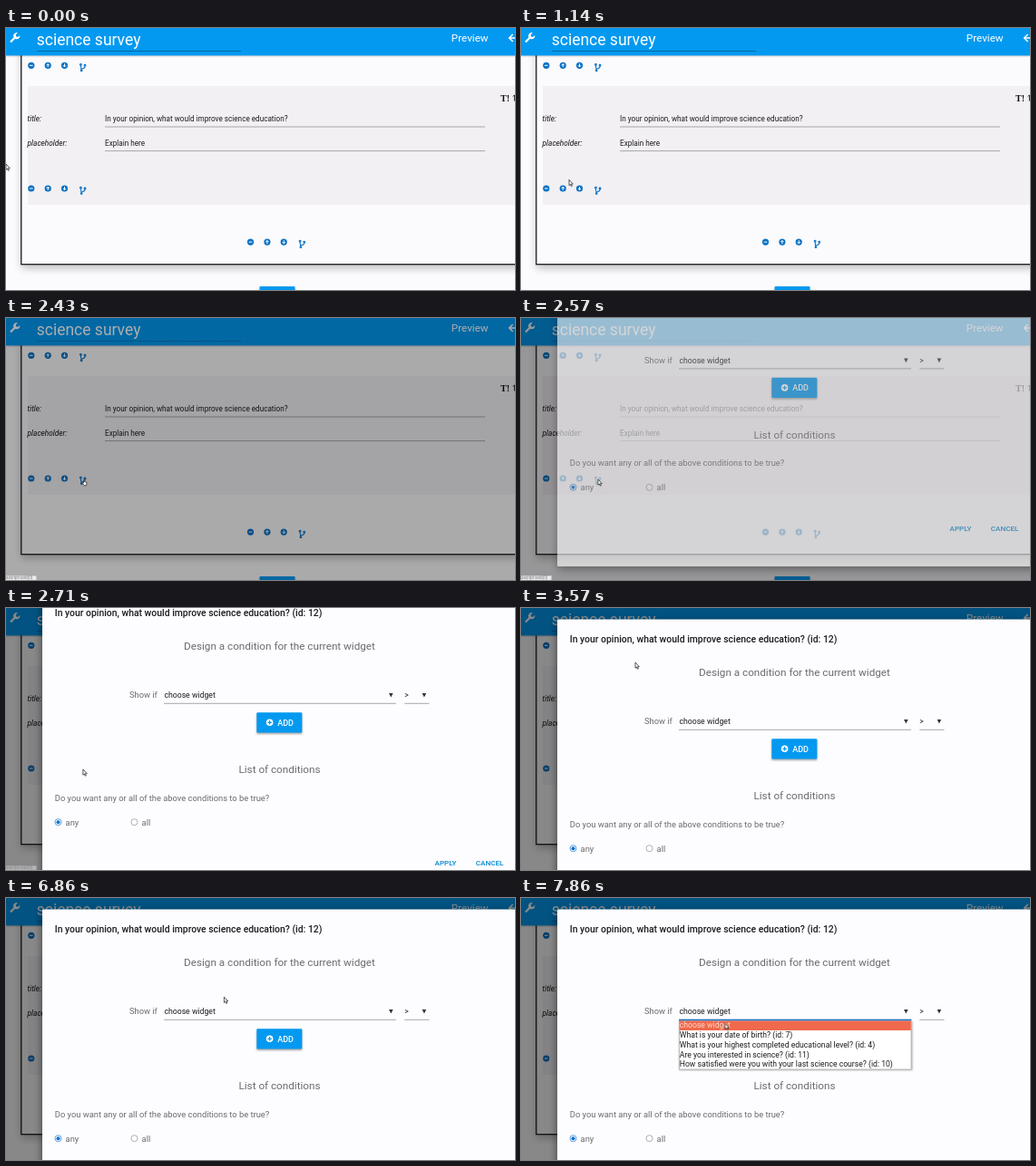
These frames come from a looping animation (561 by 289 pixels, 8000 ms). An HTML page:

```html
<!DOCTYPE html>
<html lang="en">
<head>
<meta charset="utf-8">
<title>Survey editor</title>
<style>
html, body { margin: 0; width: 100%; height: 100%; overflow: hidden; background: #fbfafc; }
svg { display: block; width: 561px; height: 289px; font-family: Roboto, sans-serif; }
text { white-space: pre; }
.field { font-size: 8.17px; fill: #1c1c1e; }
.label { font-size: 8.25px; font-style: italic; fill: #111; }
.head { font-size: 11.7px; fill: #6b6a6e; text-anchor: middle; }
.body { font-size: 9.33px; fill: #6b6a6e; }
.pick { font-size: 8.7px; fill: #1c1c1e; }
.action { font-size: 8.1px; font-weight: 500; fill: #0288d1; }
.line { stroke: #939296; stroke-width: .8; }
</style>
</head>
<body>
<svg viewBox="0 0 561 289" xmlns="http://www.w3.org/2000/svg">
  <defs>
    <filter id="soft" x="-10%" y="-20%" width="120%" height="140%"><feGaussianBlur stdDeviation="5"/></filter>
    <filter id="near" x="-10%" y="-30%" width="120%" height="160%"><feGaussianBlur stdDeviation="1.3"/></filter>
    <g id="tools">
      <g fill="#0b72c4">
        <circle cx="27.8" cy="-.2" r="3.6"/><circle cx="46.2" cy="-.2" r="3.6"/><circle cx="64.5" cy="-.2" r="3.6"/>
      </g>
      <g fill="none" stroke="#fff" stroke-width="1">
        <path d="M26-.2h3.6M46.2 1.8v-3.6M44.6-.2l1.6-1.7L47.8-.2M64.5-2.2v3.6M62.9-.2l1.6 1.7L66.1-.2"/>
      </g>
      <g fill="none" stroke="#0b72c4" stroke-width="1.1">
        <circle cx="82.4" cy="-1" r=".9"/><circle cx="87" cy="-.2" r=".9"/><circle cx="83.2" cy="5.4" r=".8"/>
        <path d="M82.4 0L83 4.6M87.1.7C87.2 3.2 84.6 3.2 83 3.8"/>
      </g>
    </g>
  </defs>

  <g id="page">
    <rect width="561" height="289" fill="#fbfafc"/>
    <rect x="17" y="20" width="560" height="245" fill="#000" opacity=".24" filter="url(#soft)"/>
    <rect x="16.8" y="20" width="560" height="240.7" fill="#fbfafc" stroke="#1b1b1d" stroke-width="1.3"/>
    <rect x="24" y="64" width="537" height="131" fill="#f2f0f3"/>
    <use href="#tools" y="41.5"/>
    <use href="#tools" y="177.2"/>
    <use href="#tools" x="241.7" y="236.3"/>
    <text x="545" y="80.5" font-family="Liberation Serif, serif" font-weight="700" font-size="10" fill="#111">T!</text>
    <path d="M558.8 75.5l1.6-1.6v6.6" fill="none" stroke="#222"/>
    <text class="label" x="23.6" y="103">title:</text>
    <text class="label" x="23.6" y="130">placeholder:</text>
    <text class="field" x="109" y="103">In your opinion, what would improve science education?</text>
    <text class="field" x="109" y="130">Explain here</text>
    <path class="line" d="M109 109H528M109 135.6H528"/>
    <rect x="279.5" y="286" width="39" height="8" fill="#000" opacity=".2" filter="url(#near)"/>
    <rect x="279.5" y="285" width="39" height="8" rx="1" fill="#0399f0"/>
    <rect y="2" width="561" height="29" fill="#000" opacity=".25" filter="url(#near)"/>
    <rect width="561" height="30.4" fill="#0399f0"/>
    <path d="M5 15.6L10.4 10" stroke="#fff" stroke-width="2.1"/>
    <path d="M12.8 5.3a3.6 3.6 0 1 0 2.4 2.6l-2.1 2-1.9-.5-.5-1.9z" fill="#fff"/>
    <text x="33.7" y="18.5" font-size="17.5" fill="#fff">science survey</text>
    <path id="rule" d="M34 25.5H259" stroke="#05629c" stroke-width=".9"/>
    <text x="490.8" y="14.6" font-size="11.7" fill="#fff">Preview</text>
    <path d="M562 11H555M558.6 7l-4 4 4 4" fill="none" stroke="#fff" stroke-width="1.5"/>
  </g>

  <rect id="dim" width="561" height="289" fill="#000"/>

  <g id="modal">
    <rect x="40" y="16" width="700" height="340" fill="#000" opacity=".55" filter="url(#soft)"/>
    <rect x="40" y="12.5" width="700" height="340" rx="1" fill="#fdfcfe"/>
    <text x="53.8" y="37.6" font-size="10.4" font-weight="500" fill="#1c1c1e">In your opinion, what would improve science education? (id: 12)</text>
    <text class="head" x="301.5" y="74.6">Design a condition for the current widget</text>
    <text class="body" x="136" y="128.4">Show if</text>
    <text class="pick" x="174.4" y="128.2">choose widget</text>
    <text class="pick" x="439.3" y="128.2">&gt;</text>
    <path d="M422 123h4.6l-2.3 4.6zM458.6 123h4.6l-2.3 4.6z" fill="#333"/>
    <path class="line" d="M174 134.3H430M439.3 134.3H466.5"/>
    <rect x="276.3" y="146" width="50" height="22" fill="#000" opacity=".35" filter="url(#near)"/>
    <rect id="add" x="276.3" y="144.2" width="50" height="22.2" rx="1"/>
    <circle cx="290.6" cy="155.3" r="3.8" fill="#fff"/>
    <path d="M288.4 155.3h4.4M290.6 153.1v4.4" stroke="#0399f0" stroke-width="1.2"/>
    <text x="299.2" y="158.6" font-size="9" font-weight="500" fill="#fff">ADD</text>
    <text class="head" x="301.5" y="211">List of conditions</text>
    <text class="body" x="53.8" y="241.8">Do you want any or all of the above conditions to be true?</text>
    <g fill="#fff" stroke="#9a999d" stroke-width=".8">
      <circle cx="57.5" cy="265.2" r="3.5" stroke="#2f86d8"/><circle cx="141.5" cy="265.2" r="3.5"/>
    </g>
    <circle cx="57.5" cy="265.2" r="2" fill="#0b72d0"/>
    <text class="body" x="65.6" y="268.5">any</text>
    <text class="body" x="149.6" y="268.5">all</text>
    <text class="action" x="472.5" y="313">APPLY</text>
    <text class="action" x="517.8" y="313">CANCEL</text>
  </g>

  <g id="menu">
    <rect x="174.4" y="136" width="257" height="54" fill="#000" opacity=".3" filter="url(#near)"/>
    <rect x="174.4" y="135" width="255.6" height="54" fill="#fff" stroke="#a9a8ac" stroke-width=".7"/>
    <rect x="174.6" y="135.4" width="255.2" height="10.6" fill="#f0694c"/>
    <path d="M174 134.5H430.3" stroke="#1976c8" stroke-width="1.5"/>
    <g id="rows"></g>
  </g>

  <g id="status">
    <rect x="-1" y="284.3" width="34.5" height="6" fill="#ebeaec" stroke="#c4c3c6" stroke-width=".5"/>
    <text x="0" y="288.2" font-size="4.6" fill="#77767a">ascript:void(0)</text>
  </g>

  <g id="pointer" stroke-linejoin="round">
    <path d="M0 0v6.3l1.4-1.2 1 2.2 1-.5-1-2.1h1.9z" fill="#fff" stroke="#222" stroke-width=".75"/>
    <path d="M.6.4q.7-.7 1.1 0v2.3l2.2.6q.5 1.8-.4 3.6H1.2L-.7 4.2q.3-.7 1.3 0z" fill="#fff" stroke="#222" stroke-width=".75"/>
    <path d="M-1.3-3.6Q0-3.6 0-2.7 0-3.6 1.3-3.6M0-2.7V2.9M-1.3 3.7Q0 3.7 0 2.9 0 3.7 1.3 3.7" fill="none" stroke="#222" stroke-width=".85"/>
  </g>
</svg>
<script>
const LOOP = 8000, FPS = 7;
const $ = id => document.getElementById(id);
const show = (id, opacity) => $(id).setAttribute("opacity", opacity);

// Pointer path: tick, x, y
const path = [
  [3, 0, 150], [11, 84.8, 177.8], [23, 85, 178], [25, 126, 60], [28, 190, 78],
  [31, 233, 128], [32, 233, 128], [34, 298, 154], [37, 307, 37], [38, 307, 37],
  [39, 307.7, 40.7], [41, 286.5, 67.5], [45, 286.5, 67.5], [49, 225, 123], [54, 225, 123], [55, 225, 138.3]
];

const options = [
  "choose widget",
  "What is your date of birth? (id: 7)",
  "What is your highest completed educational level? (id: 4)",
  "Are you interested in science? (id: 11)",
  "How satisfied were you with your last science course? (id: 10)"
];
options.forEach((label, i) => {
  const row = document.createElementNS("http://www.w3.org/2000/svg", "text");
  row.textContent = label;
  row.setAttribute("x", 174.8);
  row.setAttribute("y", 143.4 + i * 10.75);
  row.setAttribute("font-size", 8.65);
  row.setAttribute("fill", i ? "#1c1c1e" : "#ffd9cc");
  $("rows").append(row);
});

function pointerAt(n) {
  const i = path.findIndex(p => p[0] >= n);
  if (i === 0) return path[0].slice(1);
  const [a, ax, ay] = path[i - 1], [b, bx, by] = path[i];
  const u = (n - a) / (b - a);
  return [ax + (bx - ax) * u, ay + (by - ay) * u];
}

const inside = (x, y, l, t, r, b) => x >= l && x <= r && y >= t && y <= b;

function draw(ms) {
  // The screen refreshes seven times a second, on a 10 ms clock
  const n = Math.floor((ms % LOOP + 6) * FPS / 1000) % (LOOP * FPS / 1000);

  show("dim", n < 17 ? 0 : Math.min(.46, .32 + (n - 17) * .08));
  $("rule").setAttribute("stroke-dasharray", n < 17 ? "none" : "1.5 1.2");

  const drop = n < 23 ? -29 * .37 ** (n - 19) : 0;
  show("modal", n < 18 ? 0 : n === 18 ? .6 : 1);
  $("modal").setAttribute("transform", `translate(0 ${n < 18 ? 0 : drop.toFixed(2)})`);

  show("menu", n < 51 ? 0 : Math.min(1, .6 + (n - 51) * .25));
  show("status", n < 12 || n > 19 ? 0 : n === 12 ? .5 : n === 19 ? .45 : n < 17 ? .85 : 1);

  const [x, y] = pointerAt(n);
  const onAdd = n > 23 && n < 51 && inside(x, y, 276, 144, 326, 166);
  const onLink = n >= 11 && n < 18;
  const onText = n >= 36 && n <= 45;
  $("add").setAttribute("fill", onAdd ? "#22a8f5" : "#0399f0");
  $("pointer").setAttribute("transform", `translate(${x} ${y})`);
  const shape = onText ? 2 : onAdd || onLink ? 1 : 0;
  [...$("pointer").children].forEach((el, i) => el.setAttribute("opacity", i === shape ? 1 : 0));
}

const start = performance.now();
function tick() {
  draw(performance.now() - start);
  requestAnimationFrame(tick);
}
draw(0);
requestAnimationFrame(tick);
</script>
</body>
</html>
```
